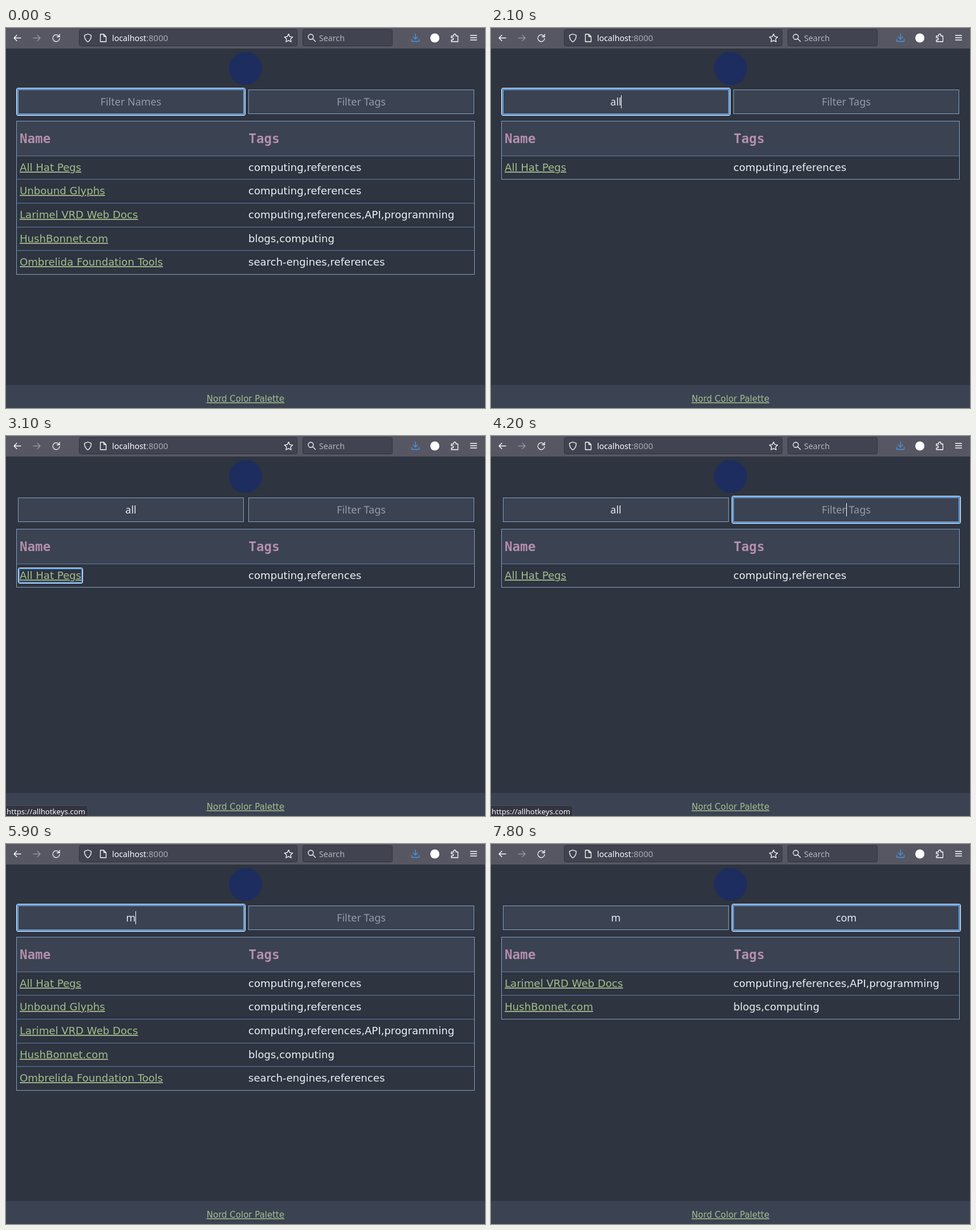
Write an HTML page that moves like this. It is 840 by 667 pixels and loops after 8 s.

```html
<!DOCTYPE html>
<html lang="en">
<head>
<meta charset="utf-8">
<title>Bookmark filter</title>
<style>
  html, body { margin: 0; width: 100%; height: 100%; overflow: hidden; background: #2e3440; }
  svg { display: block; }
  text { font: 18.1px "DejaVu Sans", sans-serif; fill: #eceff4; white-space: pre; }
  .ui { font-family: "Noto Sans", sans-serif; fill: #fbfbfe; }
  .link { fill: #a3be8c; text-decoration: underline; }
  .head { font: bold 22.5px "DejaVu Sans Mono", monospace; fill: #b48ead; }
  .field { font: 18px "Noto Sans", sans-serif; text-anchor: middle; fill: #e5e9f0; }
  .empty { fill: #959ba7; }
  .icon { fill: none; stroke: #fbfbfe; stroke-width: 1.3; stroke-linecap: round; stroke-linejoin: round; }
</style>
</head>
<body>
<svg width="840" height="667" viewBox="0 0 840 667">
  <rect width="840" height="667" fill="#2e3440"/>

  <!-- browser toolbar -->
  <rect width="840" height="36" fill="#565763"/>
  <rect y="36" width="840" height="1" fill="#32343f"/>
  <g fill="#414450" stroke="#2f323c">
    <rect x="128.5" y="2.5" width="382" height="29" rx="3"/>
    <rect x="520.5" y="2.5" width="157" height="29" rx="3"/>
  </g>
  <g class="icon">
    <path d="M26 17.5H14M19 12.5l-5 5 5 5"/>
    <path d="M48 17.5h12M55 12.5l5 5-5 5" opacity=".4"/>
    <path d="M93 14.5a6 6 0 1 0 1 4M94 11v4.500h-4.500"/>
    <path d="M143.500 10.500l6 2.300c0 6-1.500 9-6 11.700c-4.500-2.700-6-5.700-6-11.700z"/>
    <path d="M165.500 11h6l4 4v9h-10zM171.500 11v4h4"/>
    <path d="M495.500 10.500l2.200 4.600 5 .7-3.600 3.500.9 5-4.500-2.400-4.500 2.400.9-5-3.600-3.500 5-.7z"/>
    <circle cx="534.500" cy="15.500" r="4.500"/><path d="M538 19l4.500 4.500"/>
    <path d="M718 10v9M714 15.500l4 4 4-4M711.500 20v3.500h13V20" stroke="#4a96e8"/>
    <path d="M781 14h4v-1.500a2 2 0 0 1 4 0V14h3.500v10H781v-3h1.500a2 2 0 0 0 0-4H781z"/>
    <path d="M814.500 13h11M814.500 17h11M814.500 21h11"/>
  </g>
  <circle cx="752" cy="17.500" r="8" fill="#fff"/>
  <text class="ui" x="186" y="22.500" style="font-size:14.2px">localhost<tspan style="font-size:15px" fill="#a9abb5">:8000</tspan></text>
  <text class="ui" x="549" y="22.500" style="font-size:14.2px;fill:#b4b6c0">Search</text>

  <circle cx="420" cy="71" r="29" fill="#1d2d5f"/>

  <g id="fields"></g>

  <!-- table -->
  <rect x="18" y="164" width="804" height="60" fill="#3b4252"/>
  <text class="head" x="24" y="202">Name</text>
  <text class="head" x="425.500" y="202">Tags</text>
  <g id="rows"></g>
  <rect id="frame" x="18.500" y="163.500" width="803" fill="none" stroke="#81a1c1"/>
  <g id="linkRing"></g>

  <!-- footer -->
  <rect y="626.500" width="840" height="41" fill="#3b4252"/>
  <text class="link" x="420" y="656" text-anchor="middle" style="font-size:15px">Nord Color Palette</text>
  <g id="status">
    <path d="M-1 648.500H139.500a4 4 0 0 1 4 4V668H-1z" fill="#32343f" stroke="#4d5060"/>
    <text class="ui" x="1" y="664" style="font-size:13.2px">https://allhotkeys.com</text>
  </g>
</svg>
<script>
const DURATION = 8000, ROW_HEIGHT = 41.6, ROWS_TOP = 223.8;
const $ = id => document.getElementById(id);

const bookmarks = [
  ["All Hat Pegs", "computing,references"],
  ["Unbound Glyphs", "computing,references"],
  ["Larimel VRD Web Docs", "computing,references,API,programming"],
  ["HushBonnet.com", "blogs,computing"],
  ["Ombrelida Foundation Tools", "search-engines,references"],
];

// Each step changes part of the state; the table filters lag behind the typed text.
const steps = [
  [0, { names: "", tags: "", nameFilter: "", tagFilter: "", focus: "names", caret: false, selected: false, status: 0 }],
  [500, { caret: true }],
  [1700, { names: "a" }],
  [1800, { nameFilter: "a" }],
  [2000, { names: "al" }],
  [2100, { names: "all", nameFilter: "all" }],
  [2600, { focus: "tags" }],
  [2900, { focus: "link" }],
  [3000, { status: 0.6 }],
  [3100, { status: 1 }],
  [4200, { focus: "tags" }],
  [4400, { focus: "names", selected: true, caret: false, status: 0.7 }],
  [4500, { status: 0.3 }],
  [4600, { status: 0 }],
  [4800, { names: "", selected: false, caret: true }],
  [4900, { nameFilter: "" }],
  [5600, { caret: false }],
  [5900, { names: "m", caret: true }],
  [6000, { nameFilter: "m" }],
  [6600, { focus: "tags" }],
  [7400, { tags: "c" }],
  [7500, { tags: "co" }],
  [7600, { tagFilter: "co" }],
  [7700, { tags: "com", tagFilter: "com" }],
  [7800, { caret: false }],
];

const rect = (x, y, w, h, attrs) => `<rect x="${x}" y="${y}" width="${w}" height="${h}" ${attrs}/>`;

// Focus outline: white hairline around a blue band.
const ring = (x, y, w, h) =>
  rect(x + 0.5, y + 0.5, w - 1, h - 1, 'rx="2.5" fill="none" stroke="#fff"') +
  rect(x + 2, y + 2, w - 4, h - 4, 'rx="1.5" fill="none" stroke="#4a90d9" stroke-width="2"');

const measure = document.createElement("canvas").getContext("2d");
function textWidth(text, font) {
  measure.font = font;
  return measure.measureText(text).width;
}

function field(x, value, placeholder, focused, state) {
  const center = x + 198;
  const width = textWidth(value, '18px "Noto Sans", sans-serif');
  let out = rect(x + 0.5, 108.5, 395, 42, 'fill="#3b4252" stroke="#81a1c1"');
  if (focused) out += ring(x - 3, 105, 402, 49);
  if (focused && state.selected) out += rect(center - width / 2, 118, width, 23, 'fill="#4a90d9"');
  out += `<text class="field ${value ? "" : "empty"}" x="${center}" y="136">${value || placeholder}</text>`;
  if (focused && state.caret) out += rect(Math.floor(center + width / 2), 118, 1, 23, 'fill="#fff"');
  return out;
}

const rowTop = i => Math.round(ROWS_TOP + i * ROW_HEIGHT);

function render(state) {
  $("fields").innerHTML =
    field(21, state.names, "Filter Names", state.focus === "names", state) +
    field(425, state.tags, "Filter Tags", state.focus === "tags", state);

  const shown = bookmarks.filter(([name, tags]) =>
    name.toLowerCase().includes(state.nameFilter) && tags.toLowerCase().includes(state.tagFilter));
  $("rows").innerHTML = shown.map(([name, tags], i) => {
    const top = rowTop(i);
    return rect(18, top, 804, 1, 'fill="#5e81ac"') +
      `<text class="link" x="24" y="${top + 27}">${name}</text>` +
      `<text x="425" y="${top + 27}">${tags}</text>`;
  }).join("");
  $("frame").setAttribute("height", rowTop(shown.length) - 163);

  const linkWidth = Math.ceil(textWidth(shown[0][0], '18px "DejaVu Sans", sans-serif'));
  $("linkRing").innerHTML = state.focus === "link" ? ring(21, 231, linkWidth + 6, 28) : "";
  $("status").setAttribute("opacity", state.status);
}

let current = -1;
function tick() {
  const time = performance.now() % DURATION;
  const index = steps.filter(([start]) => start <= time).length;
  if (index !== current) {
    current = index;
    render(Object.assign({}, ...steps.slice(0, index).map(step => step[1])));
  }
  requestAnimationFrame(tick);
}
tick();
</script>
</body>
</html>
```
